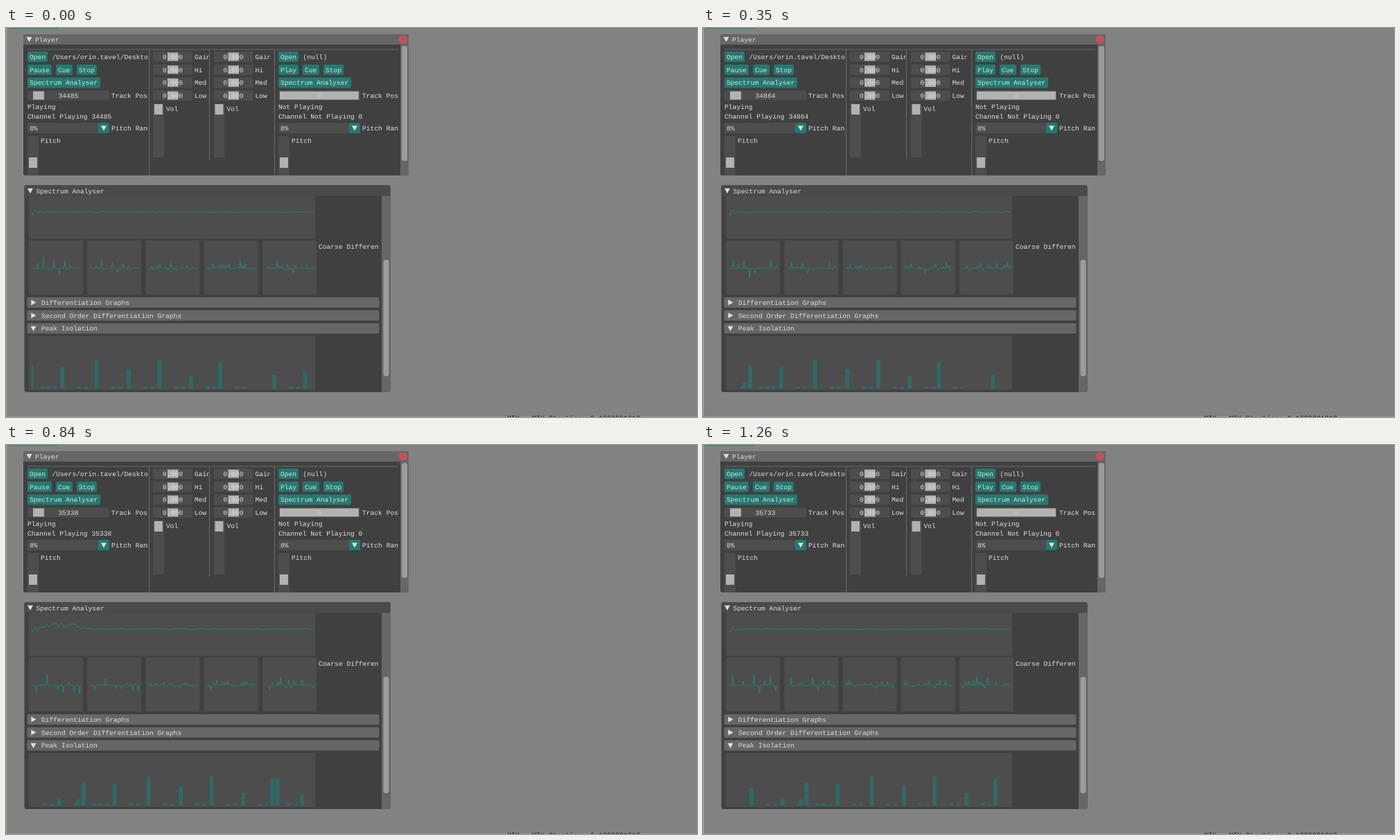
Write an HTML page with a canvas that moves like this. It is 997 px wide and 562 px high and loops after 1.33 s.

```html
<!DOCTYPE html>
<html lang="en">
<head>
<meta charset="utf-8">
<title>Player</title>
<style>
html, body { margin: 0; width: 100%; height: 100%; overflow: hidden; background: #828282; }
canvas { display: block; }
</style>
</head>
<body>
<canvas id="stage" width="997" height="562"></canvas>
<script>
const ctx = document.getElementById('stage').getContext('2d');
const STEP = 70, STEPS = 19;
const PEAK_SPEED = 6.27, PULSE_SPEED = 1.11, PULSE_GAP = 7.83;
const C = {
  back: '#828282', body: '#404040', field: '#4d4d4d', bar: '#666666', thumb: '#9c9c9c',
  grab: '#b2b2b2', rule: '#6b6b6b', teal: '#237a70', line: '#24857a', peak: '#2f6a65', text: '#dedede'
};

// Track position at a few steps
const TRACK = [[0, 34485], [3, 34730], [7, 34997], [9, 35136], [12, 35338], [15, 35530], [18, 35733]];

// Beats in the peak graph: starting centre and height
const BEATS = [
  [-43, 26], [1.5, 11], [28.6, 9], [36.6, 34], [81.3, 31], [130.5, 42],
  [177, 28], [221.5, 42], [267, 18], [309, 39], [387, 20], [431.5, 24]
];

const rnd = n => { const v = Math.sin(n * 12.9898) * 43758.5453; return v - Math.floor(v); };
const rise = (x, middle, width) => 1 / (1 + Math.exp((middle - x) / width));
const tent = (d, width) => Math.max(0, 1 - Math.abs(d) / width);

function trackAt(step) {
  const next = Math.max(1, TRACK.findIndex(([s]) => s >= step));
  const [s0, p0] = TRACK[next - 1], [s1, p1] = TRACK[next];
  return Math.round(p0 + (p1 - p0) * (step - s0) / (s1 - s0));
}

function box(x, y, w, h, color, r = 0) {
  ctx.fillStyle = color;
  ctx.beginPath();
  ctx.roundRect(x, y, w, h, r);
  ctx.fill();
}

function text(str, x, y, color = C.text) {
  ctx.fillStyle = color;
  ctx.fillText(str, x, y);
}

function centred(str, x, y, color) {
  text(str, x - ctx.measureText(str).width / 2, y, color);
}

function clipped(x, y, w, h, draw) {
  ctx.save();
  ctx.beginPath();
  ctx.rect(x, y, w, h);
  ctx.clip();
  draw();
  ctx.restore();
}

function triangle(x, y, right = false) {
  ctx.save();
  ctx.translate(x, y);
  if (right) ctx.rotate(-Math.PI / 2);
  ctx.fillStyle = C.text;
  ctx.beginPath();
  ctx.moveTo(-4, -3.2);
  ctx.lineTo(4, -3.2);
  ctx.lineTo(0, 4);
  ctx.fill();
  ctx.restore();
}

function button(label, x, y, w) {
  box(x, y, w, 15, C.teal, 2);
  text(label, x + 3, y + 11);
}

function plot(x0, x1, dx, fn) {
  ctx.strokeStyle = C.line;
  ctx.lineWidth = 1;
  ctx.beginPath();
  for (let x = x0; x <= x1; x += dx) ctx.lineTo(x, fn(x));
  ctx.stroke();
}

function deck(x, right, playing, pos) {
  clipped(x, 32, right - x, 181, () => {
    button('Open', x, 34, 29);
    text(playing ? '/Users/orin.tavel/Desktop' : '(null)', x + 35.5, 45);
    const cue = playing ? 41 : 35;
    button(playing ? 'Pause' : 'Play', x, 52.7, cue - 6);
    button('Cue', x + cue, 52.7, 24);
    button('Stop', x + cue + 30, 52.7, 29);
    button('Spectrum Analyser', x, 71.4, 105);

    box(x, 90.5, 118, 14, C.field, 2);
    if (playing) box(x + 8, 91.5, 16, 12, C.grab);
    else box(x + 2, 91.5, 114, 12, C.grab);
    centred(String(pos), x + 59, 101, playing ? C.text : '#c6c6c6');
    text('Track Pos', x + 121, 101);

    const state = playing ? 'Playing' : 'Not Playing';
    text(state, x, 117);
    text(`Channel ${state} ${pos}`, x, 131);
    box(x, 137, 104, 15, C.field, 2);
    text('8%', x + 3, 148);
    box(x + 102, 137, 16, 15, C.teal, 2);
    triangle(x + 110, 144.5);
    text('Pitch Range', x + 121, 148);
    box(x, 156, 16, 60, C.field, 2);
    box(x + 2, 187, 12, 15, C.grab);
    text('Pitch', x + 19, 166);
  });
}

function mixer(x, right) {
  clipped(x, 32, right - x, 181, () => {
    ['Gain', 'Hi', 'Med', 'Low'].forEach((label, i) => {
      const y = 34 + i * 18.7;
      box(x, y, 57, 15, C.field, 2);
      box(x + 21, y + 1.5, 15.5, 12, C.grab);
      centred('0.000', x + 28.5, y + 11);
      text(label, x + 60, y + 11);
    });
    box(x, 109, 16, 78, C.field, 2);
    box(x + 2, 110, 12, 15, C.grab);
    text('Vol', x + 19, 120);
  });
}

function playerWindow(pos) {
  box(25, 9, 556, 204, C.body, 3);
  box(25, 9, 556, 15, C.bar, [3, 3, 0, 0]);
  box(569, 24, 12, 189, C.bar, [0, 0, 3, 0]);
  box(571, 26, 8, 166, C.thumb, 3);
  triangle(33.5, 16.2);
  text('Player', 42, 20);
  box(567, 10.5, 12, 12, '#c64f60', 6);
  box(31, 30.5, 535, 1, C.rule);
  box(206, 31, 1, 182, C.rule);
  box(293, 31, 1, 159, C.rule);
  box(387, 31, 1, 182, C.rule);
  deck(31, 205, true, pos);
  mixer(212, 293);
  mixer(299.5, 380.7);
  deck(393, 566, false, 0);
}

// Signal around its rest line: a ripple, a loud beat half way, then a low swell
function signal(step, u) {
  const n = rnd(u + step * 311) - 0.5;
  const loud = step === 9 ? rise(u, 205, 15) : 0;
  const swell = tent(step - 12, 2) * rise(u, 15, 4) * (1 - rise(u, 68, 5));
  const ripple = 6 * Math.exp(-u / 9) * Math.sin(u * 0.8 + 0.3);
  const swing = Math.sin(u * 0.42) + 0.7 * Math.sin(u * 0.71 + 1) + 0.4 * Math.sin(u * 0.13);
  return ripple * (1 - swell) + n * (1.4 + 24 * loud + 5 * swell) + swing * 10 * loud - 6 * swell;
}

function pulseHeight(slot, group) {
  const kind = rnd(slot * 3.7 + group * 41), size = rnd(slot * 5.3 + group * 17);
  if (kind < 0.2) return 0;
  return kind < 0.42 ? 8 + size * 8 : -5 - size * 18;
}

// Pulses on an even grid drift right; the later bands add short spikes at half the gap
function coarseGraph(band, step) {
  const left = 33 + band * 84.25, scale = Math.max(0.35, 1 - band * 0.34);
  const group = Math.floor(step / 3), half = PULSE_GAP / 2;
  box(left, 307, 78, 78, C.field, 2);
  plot(4, 75, 0.75, u => 0) ;
  ctx.save();
  ctx.translate(left, 347.3);
  plot(4, 75, 0.75, u => {
    const pos = u - 5 - step * PULSE_SPEED;
    const slot = Math.round(pos / PULSE_GAP), cell = Math.round(pos / half);
    const pulse = pulseHeight(slot, group) * scale * tent(pos - slot * PULSE_GAP, 1.2);
    const extra = band * 4 * (0.35 - rnd(cell * 2.3 + group * 29 + band)) * tent(pos - cell * half, 1.2);
    return pulse + extra + (rnd(Math.floor(u) + step * 97 + band * 13) - 0.5) * 1.2;
  });
  ctx.restore();
}

function peakGraph(step) {
  const shift = step * PEAK_SPEED;
  const late = step >= 10 && step < 17 ? [[316.5, 39], [352, 16]] : [];
  const echoes = BEATS.flatMap(([x]) => [[x + 24, 3], [x + 34, 2.5]]);
  box(33, 445, 413, 78, C.field, 2);
  clipped(37, 445, 404, 78, () => {
    for (const [x, h] of [...BEATS, ...late, ...echoes]) box(x + shift - 3, 521 - h, 6, h, C.peak);
  });
}

function spectrumWindow(step) {
  box(26.5, 227, 528, 299, C.body, 3);
  box(26.5, 227, 528, 15.5, '#4a4a4a', [3, 3, 0, 0]);
  box(542, 242.5, 12.5, 283.5, C.bar, [0, 0, 3, 0]);
  box(544.5, 335, 8, 168, C.thumb, 3);
  triangle(35, 235);
  text('Spectrum Analyser', 43.5, 238.5);

  box(33, 242.5, 413, 62, C.field, [0, 0, 2, 2]);
  clipped(33, 242.5, 413, 62, () => plot(37, 443, 2, x => 266 + signal(step, x - 37)));
  for (let band = 0; band < 5; band++) coarseGraph(band, step);
  clipped(451, 300, 87, 30, () => text('Coarse Differentiation', 451, 319));

  ['Differentiation Graphs', 'Second Order Differentiation Graphs', 'Peak Isolation'].forEach((label, i) => {
    const y = 389 + i * 18.7;
    box(30.5, y, 508, 15, C.bar, 2);
    triangle(39.5, y + 7.6, i < 2);
    text(label, 51, y + 11);
  });
  peakGraph(step);
}

function draw(step) {
  box(0, 0, 997, 562, C.back);
  box(0, 0, 1, 562, '#a6a6a6');
  box(0, 561, 997, 1, '#9a9a9a');
  ctx.textRendering = 'geometricPrecision';
  ctx.font = '10px "Liberation Mono", monospace';
  text('MIX - MIX Starting: 0.1333331313', 723, 567, '#111');
  ctx.font = '9.64px "Liberation Mono", monospace';
  playerWindow(trackAt(step));
  spectrumWindow(step);
}

const start = performance.now();
function tick() {
  draw(Math.floor((performance.now() - start) / STEP) % STEPS);
  requestAnimationFrame(tick);
}
tick();
</script>
</body>
</html>
```
